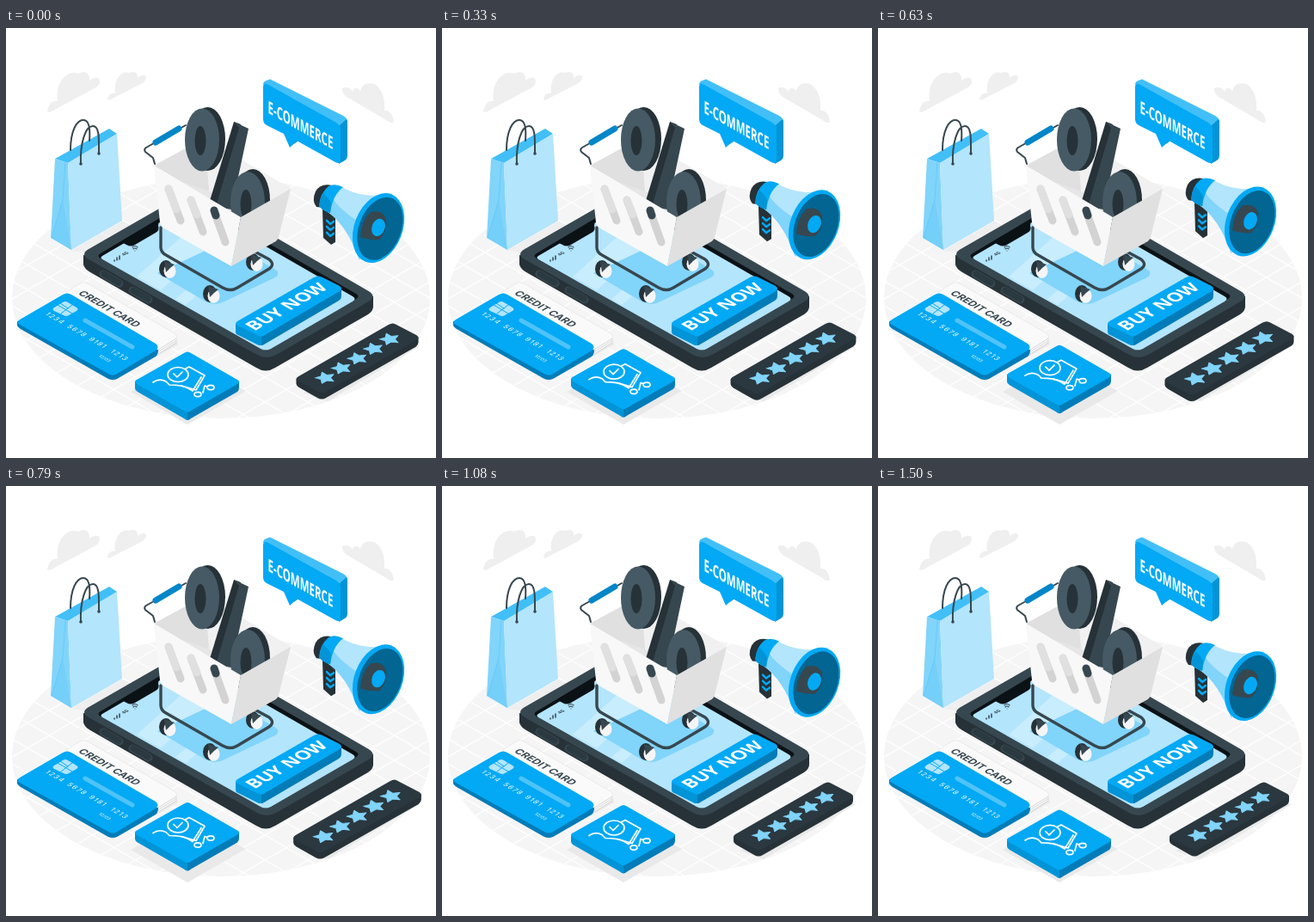
Recreate the animation shown at these times as an HTML page. Size 500x500 px, loop 1.54 s.

```html
<!DOCTYPE html>
<html lang="en">
<head>
<meta charset="utf-8">
<title>E-commerce</title>
<style>
  html, body { margin: 0; height: 100%; overflow: hidden; background: #fff }
  svg { display: block; width: 100vw; height: 100vh }
  text { font-family: "Open Sans", sans-serif; font-weight: 700; fill: #fff }
  .inter { font-family: Inter, sans-serif }
  .thin { font-weight: 400 }
  .main { fill: #03a9f4 } .lit { fill: #42bff7 } .mid { fill: #0294d6 } .deep { fill: #027cb8 }
  .pale { fill: #81d4fa } .paler { fill: #b3e5fc }
  .mist { fill: #455a64 } .dark { fill: #37474f } .darker { fill: #263238 }
  .cloud { fill: #efefef }
  .line { fill: none; stroke: #37474f; stroke-linecap: round; stroke-linejoin: round }
  .white { stroke: #fff }
  .blue { stroke: #03a9f4 }
</style>
</head>
<body>
<svg viewBox="0 0 500 500">
  <defs>
    <clipPath id="floor"><ellipse cx="250" cy="314" rx="243" ry="140"/></clipPath>
  </defs>

  <g clip-path="url(#floor)">
    <rect width="500" height="500" fill="#f5f5f5"/>
    <path id="grid" fill="none" stroke="#fff" stroke-width="1.2"/>
  </g>

  <g class="cloud">
    <path d="M48 97C50 88 54 84 60 85C57 62 72 48 84 53C94 48 98 55 97 61C104 56 109 57 109 62C109 66 106 68 103 70L51 98Z"/>
    <path d="M118 83C119 77 123 75 127 76C125 58 135 49 143 52C150 49 154 53 153 58C158 54 163 54 163 58C162 62 159 64 157 65L120 84Z"/>
    <path d="M391 70C394 68 400 69 403 74C404 69 409 69 412 73C414 64 424 62 431 67C438 73 441 84 440 96C446 95 450 101 451 109C449 111 446 110 444 108L396 80C392 77 391 73 391 70Z"/>
  </g>

  <g fill="#e9e9e9">
    <path d="M76 259L135 225L148 230L92 261Z" opacity=".6"/>
    <path d="M145 423L211 385L279 422L211 461Z"/>
    <path d="M346 424L452 362L481 370L374 434Z"/>
    <path d="M20 352L124 411L200 368L198 360Z"/>
  </g>

  <!-- shopping bag -->
  <path class="lit" d="M57 152L120 117L129 123L72 157Z"/>
  <path class="pale" d="M57 152L72 157L76 258L52 244Z"/>
  <path d="M66 200L53 244L76 258Z" fill="#74cff9"/>
  <path class="paler" d="M72 157L129 123L135 224L76 258Z"/>
  <path d="M66 200L69 156M66 200L53 244" fill="none" stroke="#5cc6f8" stroke-width=".7"/>
  <g class="line" stroke-width="2">
    <path d="M75 142C75 120 82 107 90 107C97 107 98 118 97 131"/>
    <path d="M87 158C86 135 92 114 101 114C109 114 108 130 108 146"/>
  </g>
  <circle class="dark" cx="87" cy="158" r="1.800"/><circle class="dark" cx="108" cy="146" r="1.800"/>

  <!-- phone -->
  <path class="darker" d="M90 264V275Q91 280 98 284L291 395Q302 402 313 395L421 333Q427 329 427 324V312Z"/>
  <path class="dark" d="M98 256L206 194Q217 188 228 194L420 305Q433 312 420 319L314 380Q303 386 292 380L98 270Q84 263 98 256Z"/>
  <path d="M110 262L207 204Q216 199 225 204L407 309Q412 312 407 315L308 373Q302 376 296 373L110 268Q105 265 110 262Z" fill="#0b1216"/>
  <path class="paler" d="M112 265L208 209Q216 204 224 209L403 312Q408 315 403 318L308 373Q302 376 296 373L112 269Q109 267 112 265Z"/>
  <path d="M134 249L140 252Q145 255 150 252L174 238Q179 235 177 230L178 223Z" fill="#0b1216"/>
  <path d="M152 289L218 230L245 246L180 305ZM197 315L250 270L262 277L209 322Z" fill="#c8edfd"/>
  <path class="pale" d="M176 285L232 318Q243 324 254 318L313 290Q320 285 312 280L255 248Z"/>
  <g class="line" stroke-width="9">
    <path d="M113 286L132 297M147 305L166 316" stroke="#37474f"/>
    <path d="M114 286L131 296M148 305L165 315" style="stroke:#2b3940" stroke-width="7"/>
  </g>
  <path class="line" stroke-width="1.5" d="M126 271V270M129 270V267M132 269V265"/>
  <text transform="matrix(.866 -.5 .866 .5 137 265)" font-size="5.500" style="fill:#37474f">4G</text>
  <path class="line" stroke-width="1.1" d="M147 255Q150 252 153 255M148 257Q150 255 152 257M150 259V259"/>

  <!-- buy button -->
  <path class="deep" d="M297 358L390 303V312Q390 315 387 317L300 368Q299 369 297 369Z"/>
  <path class="mid" d="M267 344V353Q267 356 270 357L294 369L297 369V358Z"/>
  <path class="main" d="M269 341L358 290Q363 287 368 290L388 300Q392 303 388 306L301 357Q297 360 292 357L269 346Q265 344 269 341Z"/>
  <text transform="matrix(.866 -.5 .866 .5 289 352.500)" font-size="20.500">BUY NOW</text>

  <!-- cart -->
  <g class="line" stroke-width="3.400">
    <path d="M180 232V255Q180 261 186 264L252 302Q261 307 269 302L306 280Q313 275 306 269L280 255"/>
    <path d="M173 158L171 151L162 144Q160 141 163 139L209 113" stroke-width="2"/>
    <path d="M174 133L201 117" style="stroke:#0286c8" stroke-width="7"/>
  </g>
  <g id="wheels"></g>
  <path d="M172 160L231 128L331 187L273 220Z" fill="#e6e6e6"/>
  <path d="M231 128L331 187L300 206L236 190Z" fill="#f1f1f1"/>
  <path d="M172 160L231 128L236 190L205 179Z" fill="#e0e0e0"/>
  <ellipse class="darker" cx="234.500" cy="129" rx="20.500" ry="37"/>
  <ellipse class="mist" cx="228" cy="130" rx="20" ry="36.500"/>
  <ellipse class="darker" cx="226" cy="131" rx="6.500" ry="17"/>
  <path class="darker" d="M265 109L273 112L250 209L236 204Z"/>
  <path class="dark" d="M265 109L282 117L262 211L244 208L271 116Z"/>
  <ellipse class="darker" cx="287" cy="200" rx="20" ry="36"/>
  <ellipse class="mist" cx="281" cy="203" rx="20" ry="36"/>
  <ellipse class="darker" cx="279" cy="205" rx="6.500" ry="17"/>
  <path d="M172 160L273 220L262 277L184 233Q180 231 179 226Z" fill="#f8f8f8"/>
  <path d="M273 220L331 187L317 243Q316 247 312 249L262 277Z" fill="#e0e0e0"/>
  <g class="line" stroke-width="9">
    <path d="M189 187L203 224M215 200L229 237M242 213L255 249" style="stroke:#d3d3d3"/>
    <path d="M189 187L198 211M215 200L222 217" style="stroke:#e0e0e0"/>
    <path d="M242 212L244 218"/>
  </g>

  <!-- cards -->
  <path d="M70 307L86 297Q90 294 95 297L196 355Q200 358 198 362V366L177 380L124 404Z" fill="#fafafa" stroke="#e0e0e0" stroke-width=".6"/>
  <path d="M177 374L198 361M177 376.500L198 363.500M177 379L198 366" stroke="#cfcfcf" stroke-width=".8"/>
  <path class="deep" d="M13 341V346Q14 348 17 350L119 408Q124 410 129 408L174 382Q177 380 177 374Z"/>
  <path class="main" d="M16 339L66 310Q71 307 76 310L174 367Q179 371 174 375L129 402Q124 405 119 402L16 345Q11 342 16 339Z"/>
  <text class="inter" transform="matrix(.866 .5 -.866 .5 83 309)" font-size="11.600" style="fill:#37474f">CREDIT CARD</text>
  <path class="paler" d="M56 325L66 319Q69 317 72 319L82 325Q85 327 82 329L73 334Q70 336 67 334L56 329Q53 327 56 325Z"/>
  <path class="line blue" d="M60 322L77 332M64 332L77 322M63 320L72 326"/>
  <path class="line" d="M92 340L147 371" style="stroke:#4fc3f7" stroke-width="5"/>
  <g id="digits"></g>
  <text class="inter thin" transform="matrix(.866 .5 -.866 .5 107 381.500)" font-size="5.500">12/03</text>

  <!-- speech bubble -->
  <path class="lit" d="M299 66Q299 62 303 61L307 59.500L392 102Q397 105 397 109L389 118Z"/>
  <path class="mid" d="M387 114L396 106Q397 108 397 110V149Q397 152 394 154L387 158ZM330 138L339 132L336 126Z"/>
  <path class="main" d="M299 69Q299 63 305 66L384 110Q389 113 389 118V153Q389 159 383 156L338 131L330 139L323 123L303 113Q299 111 299 106Z"/>
  <text transform="matrix(.575 .325 0 1 304.500 98.500)" font-size="20">E-COMMERCE</text>

  <g id="tile">
    <path class="mid" d="M150 411V419Q150 421 153 423L207 454Q209 456 211 456L211 446Z"/>
    <path class="deep" d="M211 446V456Q213 456 215 454L269 423Q271 421 271 418V411Z"/>
    <path class="main" d="M152 409L207 378Q211 375 215 378L269 409Q273 411 269 414L215 445Q211 448 207 445L152 414Q148 411 152 409Z"/>
    <g class="line white" stroke-width="1.700">
      <ellipse cx="200" cy="403" rx="12" ry="8.500"/>
      <path d="M195 402L199 406L205 400M209 396L213 394L231 404L221 421L204 416"/>
      <path d="M171 412Q178 407 186 411L190 415Q205 415 212 419L217 422M227 406L217 422M229 424L231 416L234 417"/>
      <ellipse cx="223" cy="426" rx="4" ry="2.600"/>
      <ellipse cx="238" cy="418" rx="4" ry="2.600"/>
    </g>
  </g>

  <g id="rating">
    <path class="darker" d="M339 408V413Q339 415 342 417L363 429Q368 432 373 429L475 371Q478 369 478 366V360Z"/>
    <path d="M341 405L444 346Q449 343 453 346L476 358Q480 361 476 363L373 422Q368 425 364 422L341 410Q337 408 341 405Z" fill="#2b383f"/>
    <g id="stars" class="pale"></g>
  </g>

  <g id="horn">
    <path class="darker" d="M368 211L383 213V249L378 252L369 244Z"/>
    <path class="line blue" d="M373 224L377 228L381 225M373 231L377 235L381 232M373 238L377 242L381 239" stroke-width="2.500"/>
    <path class="darker" d="M379 183Q366 180 360 190Q355 201 361 208L370 209Z"/>
    <path class="paler" d="M389 184C405 194 428 198 449 192L411 270C404 250 393 227 374 214Z"/>
    <path class="pale" d="M380 198C390 215 410 222 414 232L411 270C404 250 393 227 374 214Z"/>
    <path class="main" d="M375 184Q382 180 392 185Q380 194 377 215Q369 213 364 207Q365 192 375 184Z"/>
    <path class="mid" d="M364 207Q365 199 369 192Q376 199 378 204L377 215Q369 213 364 207Z"/>
    <g transform="rotate(21 434 233)">
      <ellipse class="main" cx="433" cy="233" rx="28" ry="42"/>
      <ellipse cx="435" cy="233" rx="24.500" ry="38" fill="#026592"/>
    </g>
    <path class="dark" d="M412 243Q413 224 424 214Q438 211 442 222Q444 236 434 246Q424 247 412 243Z"/>
    <ellipse class="main" cx="433" cy="232" rx="7.500" ry="10.500" transform="rotate(21 433 232)"/>
  </g>
</svg>

<script>
const LOOP = 1540;
const byId = id => document.getElementById(id);

let grid = '';
for (let y = -290; y < 790; y += 29) grid += `M0 ${y}l500 289M0 ${y}l500 -289`;
byId('grid').setAttribute('d', grid);

byId('wheels').innerHTML = [[188, 280], [239, 309], [289, 272]].map(([x, y]) => `
  <g transform="translate(${x} ${y})">
    <ellipse class="darker" cx="-2" rx="8" ry="10"/>
    <ellipse cx="2.5" cy="2.500" rx="7" ry="8.500" fill="#f5f5f5"/>
    <path class="dark" d="M-4 -9L8 -5L3 -1L-2 4Z"/>
  </g>`).join('');

byId('digits').innerHTML = ['1234', '5678', '9181', '1213'].map((group, i) =>
  `<text class="inter thin" transform="matrix(.866 .5 -.866 .5 ${45 + 25.2 * i} ${333 + 14.5 * i})"
    font-size="8" letter-spacing="1.300">${group}</text>`).join('');

const starPoints = Array.from({ length: 10 }, (_, i) => {
  const r = i % 2 ? 4.8 : 9.6, a = i * Math.PI / 5 - Math.PI / 4;
  return [r * Math.sin(a), -r * Math.cos(a)];
}).join(' ');
byId('stars').innerHTML = [-2, -1, 0, 1, 2].map(i =>
  `<polygon points="${starPoints}" stroke="#81d4fa" stroke-linejoin="round"
    transform="translate(${408.7 + 18.3 * i} ${384.3 - 11 * i}) matrix(.866 -.5 .866 .5 0 0)"/>`).join('');

// Smooth rise and fall, 0 to 1 to 0 once per loop
const bob = t => (1 - Math.cos(2 * Math.PI * t / LOOP)) / 2;

// Double heartbeat: [progress, strength]
const beats = [[0, .25], [.14, 1], [.3, 0], [.44, 1], [.68, 0], [1, 0]];
function heartbeat(p) {
  const i = beats.findIndex(([end]) => p < end);
  const [from, a] = beats[i - 1], [to, b] = beats[i];
  const k = (p - from) / (to - from);
  return a + (b - a) * k * k * (3 - 2 * k);
}

function draw(now) {
  const t = now % LOOP;
  const scale = 1 + .09 * heartbeat(t / LOOP);
  byId('tile').setAttribute('transform', `translate(0 ${-8.5 * bob(t)})`);
  byId('horn').setAttribute('transform', `translate(0 ${-8 * bob(t + 45)})`);
  byId('rating').setAttribute('transform', `translate(408.5 386) scale(${scale}) translate(-408.5 -386)`);
}

const start = performance.now();
(function frame() {
  draw(performance.now() - start);
  requestAnimationFrame(frame);
})();
</script>
</body>
</html>
```
